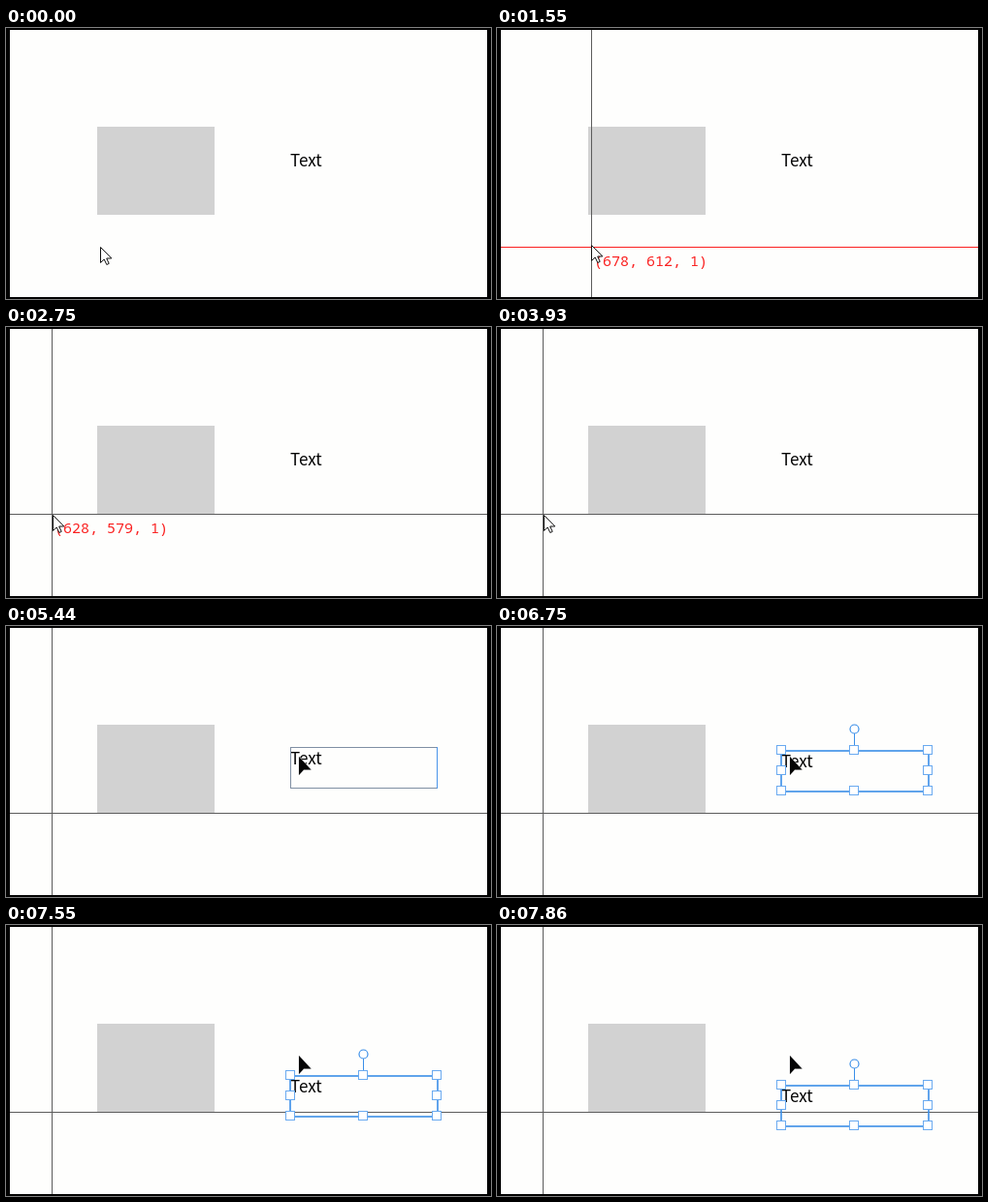
Animation, 500 px wide and 280 px high, one loop 8 s. Source, as an HTML page with a canvas:

```html
<!DOCTYPE html>
<html lang="en">
<head>
<meta charset="utf-8">
<title>Crosshair guides</title>
<style>
  html, body { margin: 0; width: 100%; height: 100%; overflow: hidden; background: #000; }
  canvas { display: block; }
</style>
</head>
<body>
<canvas id="stage" width="500" height="280"></canvas>
<script>
const ctx = document.getElementById('stage').getContext('2d');
const LOOP = 8000;
const GREY = '#5c5c5c', RED = '#fa2020', BLUE = '#3a8ee8';
const BOX = { x: 94, y: 102, w: 121, h: 91 };
const TEXT = { x: 293, y: 125, w: 151, h: 42 };
const LABEL_OFFSET = { x: 581, y: 386 };

// Keys are [time, ...values], joined by straight segments.
const aimPath = [[1510, 97, 226], [1550, 97, 224], [1800, 82, 220], [2060, 60, 214],
                 [2100, 52, 205], [2310, 48, 198], [2370, 48, 197], [2710, 47, 193]];
const pickPath = [[5166, 48, 194], [5440, 302, 135]];
const nudgePath = [[6720, 2], [7480, 29], [7550, 30], [7860, 40]];

function along(path, t) {
  if (t <= path[0][0]) return path[0].slice(1);
  for (let i = 1; i < path.length; i++) {
    const [a, ...from] = path[i - 1], [b, ...to] = path[i];
    if (t < b) return from.map((v, k) => Math.round(v + (to[k] - v) * (t - a) / (b - a)));
  }
  return path[path.length - 1].slice(1);
}

function stepTime(t, start, interval) {
  return start + Math.floor((t - start) / interval) * interval;
}

function fill(color, x, y, w, h) {
  ctx.fillStyle = color;
  ctx.fillRect(x, y, w, h);
}

function outline(color, x, y, w, h, width = 1) {
  ctx.strokeStyle = color;
  ctx.lineWidth = width;
  ctx.strokeRect(x, y, w, h);
}

function write(text, x, y, font, color) {
  ctx.font = font;
  ctx.fillStyle = color;
  ctx.fillText(text, x, y);
}

function crosshair(x, y, colorX, colorY) {
  fill(colorX, x, 2, 1, 276);
  fill(colorY, 4, y, 492, 1);
}

function pointer(x, y, dark) {
  const path = new Path2D(dark
    ? 'M0 0 V19 L5 13.5 H12.5 Z'
    : 'M.5 .5 V16.5 L4.2 13 L6.8 18.5 L9.2 17.4 L6.7 12 H11.8 Z');
  ctx.save();
  ctx.translate(x, y);
  ctx.lineWidth = 1;
  ctx.lineJoin = 'round';
  ctx.strokeStyle = dark ? '#d8d8d8' : '#111';
  ctx.fillStyle = dark ? '#050505' : '#fff';
  if (dark) { ctx.stroke(path); ctx.fill(path); }
  else { ctx.fill(path); ctx.stroke(path); }
  ctx.restore();
}

function hover({ x, y, w, h }) {
  outline('#7f8fa3', x + .5, y + .5, w, h);
  fill('#4a94ea', x + w, y, 1, h + 1);
}

function selection(y) {
  const { x, w, h } = TEXT;
  const middle = x + 75;
  outline(BLUE, x, y + 1, w + 1, h, 1.6);
  fill(BLUE, middle, y - 17, 1, 14);
  ctx.beginPath();
  ctx.arc(middle + .5, y - 21.5, 4.5, 0, 7);
  ctx.fillStyle = '#fff';
  ctx.fill();
  ctx.lineWidth = 1.2;
  ctx.stroke();
  for (const hx of [x, middle, x + w])
    for (const hy of [y, y + h / 2, y + h]) {
      if (hx === middle && hy === y + h / 2) continue;
      fill('#fff', hx - 4, hy - 4, 9, 9);
      outline('#6aaaf0', hx - 4.5, hy - 4.5, 9, 9);
    }
}

function aiming(t) {
  const moving = t >= 1550 && t < 2750;
  const now = moving ? stepTime(t, 1550, 40) : t;
  const [x, y] = along(aimPath, now - 40);
  const [tipX, tipY] = along(aimPath, now);
  crosshair(x, y, moving && tipX !== 97 ? RED : GREY, moving ? RED : GREY);
  if (t < 3930)
    write(`(${x + LABEL_OFFSET.x}, ${y + LABEL_OFFSET.y}, 1)`, x + 3, y + 20,
      '15px "Noto Sans Mono", monospace', RED);
  if (t < 2750) pointer(tipX, tipY);
  else pointer(48, 194);
}

function picking(t) {
  const [x, y] = along(pickPath, t < 5440 ? stepTime(t, 5200, 34) : t);
  crosshair(47, 193, GREY, GREY);
  if (t < 5860) {
    if (x >= BOX.x && x <= BOX.x + BOX.w) hover(BOX);
    if (x >= TEXT.x) hover(TEXT);
  } else {
    selection(TEXT.y + nudge(t));
  }
  pointer(x, y, true);
}

function nudge(t) {
  if (t < 6440) return 0;
  return t < 6720 ? 1 : along(nudgePath, t)[0];
}

function draw(t) {
  fill('#000', 0, 0, 500, 280);
  fill('#fefefd', 4, 2, 492, 276);
  fill('#d2d2d2', BOX.x, BOX.y, BOX.w, BOX.h);
  write('Text', TEXT.x, TEXT.y + 18 + nudge(t),
    '17px "Noto Sans CJK JP", "Noto Sans CJK", "Noto Sans", sans-serif', '#000');
  if (t < 750) pointer(97, 226);
  else if (t < 5000) aiming(t);
  else picking(t);
}

const began = performance.now();
function frame() {
  draw((performance.now() - began) % LOOP);
  requestAnimationFrame(frame);
}
frame();
</script>
</body>
</html>
```
